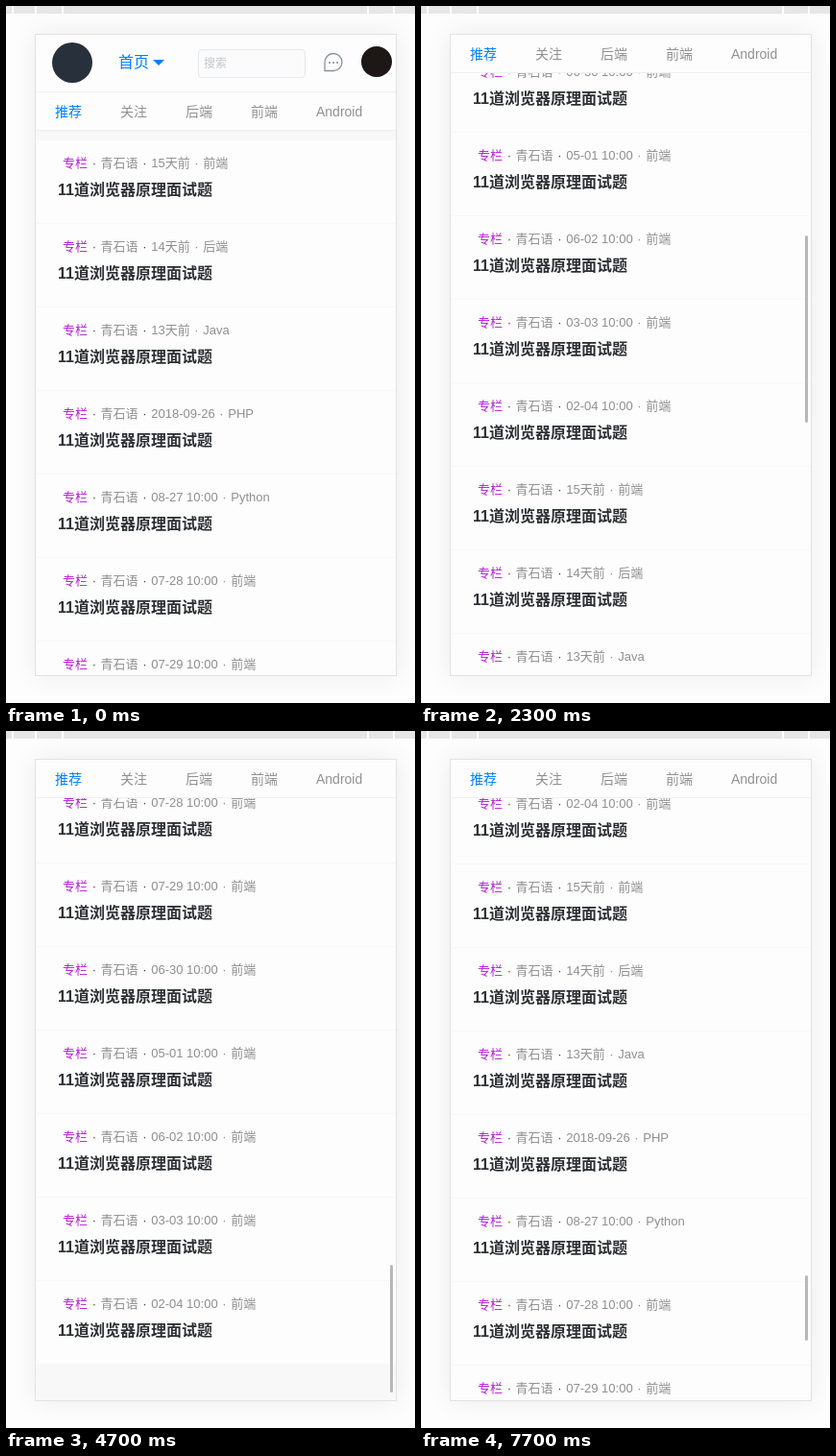
An HTML page that plays this animation: 426 px wide and 726 px high, repeating every 8.1 s.

```html
<!DOCTYPE html>
<html lang="zh-CN">
<head>
<meta charset="utf-8">
<title>文章列表</title>
<style>
  html, body { margin: 0; width: 100%; height: 100%; overflow: hidden; background: #fdfdfd; }
  body { position: relative; font-family: "Liberation Sans", "Noto Sans CJK SC", "Noto Sans CJK", sans-serif; }
  body * { position: absolute; box-sizing: border-box; white-space: nowrap; }
  #strip { left: 0; top: 0; width: 426px; height: 8px; background: #e6e6e6; }
  #strip i { top: 0; width: 2px; height: 8px; background: #fdfdfd; }
  #frame { left: 30px; top: 29px; width: 377px; height: 669px; border: 1px solid #e1e2e4;
    background: #f8f8f9; overflow: hidden; }
  #shadow { left: 30px; top: 29px; width: 377px; height: 669px; box-shadow: 0 0 26px rgba(0, 0, 0, .07); }
  #list { left: 0; top: 110px; width: 375px; overflow: hidden; background: #fdfdfd; }
  .item { left: 0; width: 375px; height: 87px; border-bottom: 1px solid #f8f8f9; }
  .meta { left: 28px; top: 14px; font-size: 13px; line-height: 20px; color: #8f8f8f; }
  .meta * { position: static; }
  .meta b { font-weight: 400; color: #b71ed7; }
  .meta i { display: inline-block; width: 13.6px; text-align: center; font-style: normal; }
  .meta .dark { color: #444; }
  .title { left: 23px; top: 42px; font-size: 16px; font-weight: 700; line-height: 20px; color: #2b2e32; }
  #head { left: 0; top: 0; width: 375px; height: 100px; }
  #nav { left: 0; top: 0; width: 375px; height: 60px; background: #fdfdfd; border-bottom: 1px solid #f1f1f2; }
  #home { left: 86px; top: 19px; font-size: 16px; line-height: 20px; color: #007fff; }
  #search { left: 169px; top: 15px; width: 112px; height: 30px; padding-left: 5px; border: 1px solid #e5e8ec;
    border-radius: 4px; background: #fbfbfc; font-size: 12px; line-height: 28px; color: #c3c6ca; }
  #tabs { left: 0; top: 60px; width: 375px; height: 40px; background: #fdfdfd; border-bottom: 1px solid #efeff1; }
  #tabs span { top: 10px; font-size: 14px; line-height: 20px; color: #909090; }
  #tabs span:first-child { color: #007fff; }
  #thumb { left: 369px; width: 3px; border-radius: 1.5px; background: #b8b8b8; }
</style>
</head>
<body>
<div id="strip"></div>
<div id="shadow"></div>
<div id="frame">
  <div id="list"></div>
  <div id="head">
    <div id="nav">
      <svg width="375" height="59">
        <circle cx="38" cy="29" r="21" fill="#28303c"/>
        <path d="M122 26h12l-6 6z" fill="#007fff"/>
        <g fill="none" stroke="#8791a0" stroke-width="1.3">
          <path d="M301 37.5V29a9 9 0 1 1 9 8.5z" stroke-linejoin="round"/>
          <path d="M306 29h.1m3.9 0h.1m3.9 0h.1" stroke-width="2" stroke-linecap="round"/>
        </g>
        <circle cx="355" cy="28" r="16" fill="#1d1716"/>
      </svg>
      <div id="home">首页</div>
      <div id="search">搜索</div>
    </div>
    <div id="tabs"></div>
  </div>
  <div id="thumb"></div>
</div>
<script>
const LOOP = 8100, STEP = 100, ITEM = 87;
const $ = id => document.getElementById(id);
const posts = [
  ['15天前', '前端'], ['14天前', '后端'], ['13天前', 'Java'], ['2018-09-26', 'PHP'], ['08-27 10:00', 'Python'],
  ...['07-28', '07-29', '06-30', '05-01', '06-02', '03-03', '02-04'].map(day => [day + ' 10:00', '前端'])
];
const PAGE = posts.length * ITEM, PAGES = 6;

$('strip').innerHTML = [6, 30, 58, 376, 403].map(x => `<i style="left:${x}px"></i>`).join('');
$('tabs').innerHTML = ['推荐', '关注', '后端', '前端', 'Android']
  .map((name, i) => `<span style="left:${20 + 68 * i}px">${name}</span>`).join('');
$('list').innerHTML = Array.from({ length: PAGES * posts.length }, (_, i) => {
  const [date, tag] = posts[i % posts.length];
  return `<div class="item" style="top:${i * ITEM}px">
    <div class="meta"><b>专栏</b><i class="dark">·</i>青石语<i class="dark">·</i>${date}<i>·</i>${tag}</div>
    <div class="title">11道浏览器原理面试题</div></div>`;
}).join('');

// [time, scroll offset], joined by a monotone cubic curve
const keys = [[400, 0], [1400, 456], [1600, 524], [1800, 524], [3000, 1202], [3900, 1807],
  [4700, 2612], [4800, 2612], [5600, 3387], [6700, 4468], [7700, 5221]];
const slope = i => keys[i + 1] && keys[i] ? (keys[i + 1][1] - keys[i][1]) / (keys[i + 1][0] - keys[i][0]) : 0;
const tangent = i => {
  const a = slope(i - 1), b = slope(i);
  return a && b ? 2 * a * b / (a + b) : 0;
};

function scrollAt(t) {
  const next = keys.findIndex(key => t < key[0]);
  if (next === 0) return 0;
  if (next < 0) return keys[keys.length - 1][1];
  const i = next - 1, [t0, y0] = keys[i], [t1, y1] = keys[next];
  const d = t1 - t0, u = (t - t0) / d, v = 1 - u;
  return y0 * v * v * (1 + 2 * u) + y1 * u * u * (3 - 2 * u) + d * u * v * (tangent(i) * v - tangent(next) * u);
}

function draw(now) {
  const t = Math.floor(now % LOOP / STEP) * STEP;
  const scroll = Math.round(scrollAt(t));
  // another page of posts is appended whenever the bottom is reached
  const pages = Math.max(1, Math.ceil((scroll + 520) / PAGE));
  const height = 140 + pages * PAGE;
  $('list').style.height = pages * PAGE + 'px';
  $('list').style.transform = `translateY(${-scroll}px)`;
  $('head').style.transform = `translateY(${-Math.min(scroll, 60)}px)`;
  const thumb = $('thumb').style;
  thumb.display = scroll ? 'block' : 'none';
  thumb.top = Math.round(.8 + 657.7 * scroll / height) + 'px';
  thumb.height = Math.round(434200 / height) + 'px';
}

const start = performance.now();
(function tick() {
  draw(performance.now() - start);
  requestAnimationFrame(tick);
})();
</script>
</body>
</html>
```
